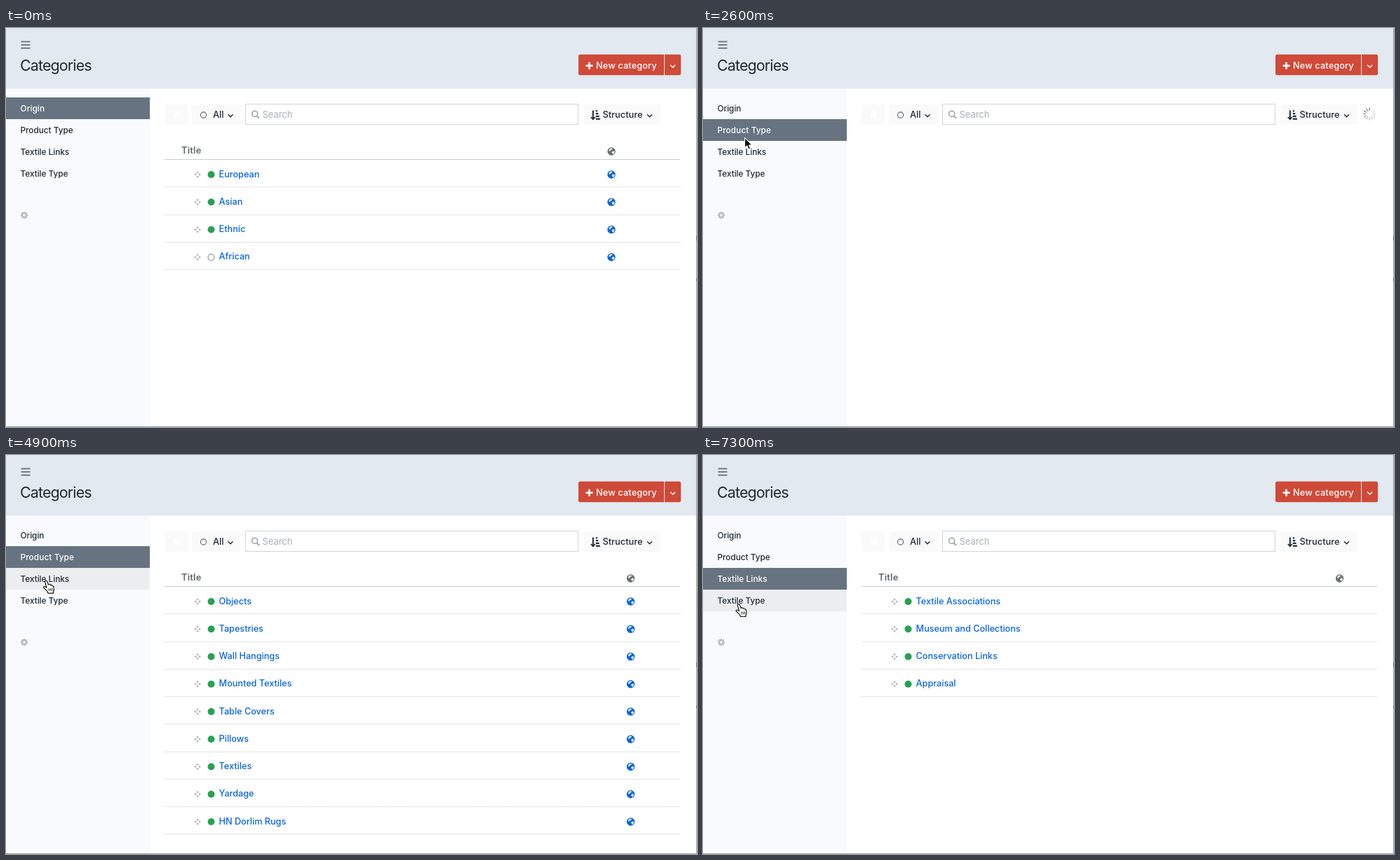
Recreate the animation shown at these times as an HTML page with a canvas. Size 985 by 569 pixels, loop 8 s.

```html
<!DOCTYPE html>
<html lang="en">
<head>
<meta charset="utf-8">
<title>Categories</title>
<style>
html, body { margin: 0; width: 100%; height: 100%; overflow: hidden; background: #fff; }
canvas { display: block; }
</style>
</head>
<body>
<canvas id="stage" width="985" height="569"></canvas>
<script>
const ctx = document.getElementById('stage').getContext('2d');
const LOOP = 8000, STEP = 100, TAU = Math.PI * 2;
const MENU_TOP = 99, MENU_PITCH = 31.1, ROW_PITCH = 39.25;
const BLUE = '#0a65db', INK = '#1f2933';

const menu = ['Origin', 'Product Type', 'Textile Links', 'Textile Type'];
const lists = [
  { globeX: 863, rows: ['European', 'Asian', 'Ethnic', 'African'], disabled: 'African', globes: true },
  { globeX: 890.5, globes: true, rows: ['Objects', 'Tapestries', 'Wall Hangings', 'Mounted Textiles',
    'Table Covers', 'Pillows', 'Textiles', 'Yardage', 'HN Dorlim Rugs'] },
  { globeX: 907.5, rows: ['Textile Associations', 'Museum and Collections', 'Conservation Links', 'Appraisal'] }
];

// Each click selects a menu item; readyAt is when its list appears.
const clicks = [{ at: 2500, readyAt: 2900, item: 1 }, { at: 5400, readyAt: 5900, item: 2 }];

const pointerPath = [
  [1100, 92, 252], [1200, 84, 216], [1300, 75, 181], [1400, 67.4, 152.6], [1600, 59, 147],
  [2000, 59, 147], [2400, 60.3, 146], [2500, 60.3, 147], [2800, 58.2, 176], [2900, 57.8, 177.4],
  [3900, 57.8, 177.4], [4600, 57.4, 179.4], [5400, 57.4, 179.4], [5700, 51.8, 211],
  [5800, 51.4, 212], [7000, 51.4, 212], [7300, 51, 212.8]
];

function pointerAt(t) {
  if (t < pointerPath[0][0]) return null;
  const next = pointerPath.findIndex(p => p[0] > t);
  if (next < 0) {
    const [, x, y] = pointerPath[pointerPath.length - 1];
    return { x, y };
  }
  const [t0, x0, y0] = pointerPath[next - 1], [t1, x1, y1] = pointerPath[next];
  const k = (t - t0) / (t1 - t0);
  return { x: x0 + (x1 - x0) * k, y: y0 + (y1 - y0) * k };
}

function hoveredItem(t) {
  const p = pointerAt(t);
  return p ? Math.floor((p.y + 1 - MENU_TOP) / MENU_PITCH) : -1;
}

function rect(x, y, w, h, color) {
  ctx.fillStyle = color;
  ctx.fillRect(x, y, w, h);
}

function roundBox(x, y, w, h, radii, color) {
  ctx.fillStyle = color;
  ctx.beginPath();
  ctx.roundRect(x, y, w, h, radii);
  ctx.fill();
}

function text(str, x, y, color, size = 12.8, weight = 500, spacing = 0) {
  ctx.font = `${weight} ${size}px Inter, sans-serif`;
  ctx.letterSpacing = spacing + 'px';
  ctx.fillStyle = color;
  ctx.fillText(str, x, y);
}

function disc(x, y, r, color) {
  ctx.fillStyle = color;
  ctx.beginPath();
  ctx.arc(x, y, r, 0, TAU);
  ctx.fill();
}

function ring(x, y, r, color, width = 1.1) {
  ctx.strokeStyle = color;
  ctx.lineWidth = width;
  ctx.beginPath();
  ctx.arc(x, y, r, 0, TAU);
  ctx.stroke();
}

function line(color, width, ...points) {
  ctx.strokeStyle = color;
  ctx.lineWidth = width;
  ctx.beginPath();
  points.forEach(([x, y]) => ctx.lineTo(x, y));
  ctx.stroke();
}

function chevron(x, y, color) {
  line(color, 1.4, [x - 3.5, y - 1.8], [x, y + 1.7], [x + 3.5, y - 1.8]);
}

function shape(x, y, path, fill, stroke, width) {
  const p = new Path2D(path);
  ctx.save();
  ctx.translate(x, y);
  ctx.lineJoin = 'round';
  if (fill) {
    ctx.fillStyle = fill;
    ctx.fill(p);
  }
  if (stroke) {
    ctx.strokeStyle = stroke;
    ctx.lineWidth = width;
    ctx.stroke(p);
  }
  ctx.restore();
}

function globe(x, y, color) {
  disc(x, y, 5.7, color);
  shape(x, y, 'M-.8-4.4L1.6-4L.6-2.6L-.8-2.2L-1.6-.8L-3-.2L-3.6-1.8L-2.4-3.4Z' +
    'M1 .4L2.6-.6L4.6.2L3.8 2.8L2 4.2L1.6 2.4L.4 1.6Z', '#fff');
}

function moveHandle(x, y) {
  const d = (dx, dy) => `M${dx} ${dy - 1.8}l1.8 1.8l-1.8 1.8l-1.8-1.8z`;
  shape(x, y, d(0, -3) + d(3, 0) + d(0, 3) + d(-3, 0), '#b3b7bb');
}

function gear(x, y) {
  for (let i = 0; i < 8; i++) {
    const a = i * TAU / 8, c = Math.cos(a), s = Math.sin(a);
    line('#b9bdc2', 2, [x + c * 3, y + s * 3], [x + c * 5.2, y + s * 5.2]);
  }
  ring(x, y, 2.9, '#b9bdc2', 2.3);
}

function spinner(t) {
  const head = Math.round((t - 5800) / 83.3) + 11;
  for (let i = 0; i < 12; i++) {
    const age = ((head - i) % 12 + 12) % 12;
    const a = i * TAU / 12, c = Math.cos(a), s = Math.sin(a);
    line(`rgba(70,75,80,${0.85 - age * 0.068})`, 1.1,
      [950 + c * 4.7, 122.5 + s * 4.7], [950 + c * 9, 122.5 + s * 9]);
  }
}

function drawHeader() {
  rect(0, 0, 985, 86.5, '#e2e9f0');
  for (let i = 0; i < 3; i++) rect(21.5, 18.6 + i * 4.6, 13, 1.8, '#66717b');
  text('Categories', 20, 61, INK, 21.4, 400, -0.83);
  const red = '#cf4a38';
  roundBox(816, 37.7, 122, 29.6, [2.5, 0, 0, 2.5], red);
  roundBox(939, 37.7, 23, 29.6, [0, 2.5, 2.5, 0], red);
  rect(826.5, 52.5, 10, 2.6, '#fff');
  rect(830.2, 48.8, 2.6, 10, '#fff');
  text('New category', 841, 57.6, '#fff', 12.7, 500, 0.15);
  chevron(950.5, 54.5, '#fff');
}

function drawSidebar(t, selected) {
  rect(0, 86.5, 205, 482, '#f8fafe');
  const hover = hoveredItem(t), trail = hoveredItem(t - STEP);
  menu.forEach((label, i) => {
    const y = Math.round(MENU_TOP + i * MENU_PITCH), active = i === selected;
    if (active) rect(0, y, 205, 31, '#677381');
    else if (i === hover) rect(0, y, 204.5, 31, '#ecedf1');
    else if (i === trail && t < 2000) rect(0, y, 204.5, 31, '#f1f2f5');
    text(label, 20.5, y + 20.4, active ? '#fff' : INK, 11.75, 500, active ? 0.12 : 0);
  });
  gear(26, 267);
}

function drawToolbar() {
  const soft = '#fafafb';
  roundBox(226, 109, 33, 29, 2.5, soft);
  disc(243, 123.5, 5, '#fff');
  roundBox(265, 109, 70, 29, 2.5, soft);
  ring(281.5, 124, 4.1, '#5b646c');
  text('All', 295, 128.2, INK);
  chevron(320, 125, INK);
  ctx.strokeStyle = '#d0d4d9';
  ctx.lineWidth = 1;
  ctx.strokeRect(341.5, 108.5, 474, 29);
  ring(354.6, 122.4, 4, '#a3a8ad', 1.7);
  line('#a3a8ad', 2.1, [357.6, 125.4], [361, 128.8]);
  text('Search', 365.5, 128.2, '#a9aeb4', 12.9, 400);
  roundBox(823, 109, 110, 29, 2.5, soft);
  line(INK, 2, [836.8, 117.5], [836.8, 130]);
  line(INK, 1.8, [833.8, 127], [836.8, 130.2], [839.8, 127]);
  for (let i = 0; i < 4; i++) rect(840.8, 117.2 + i * 3.8, 2.2 + i * 1.3, 2.2, INK);
  text('Structure', 850.5, 128.2, INK);
  chevron(917.5, 125, INK);
}

function drawList(list) {
  text('Title', 250, 179, '#5f656b', 12.8, 600, 0.25);
  globe(list.globeX, 176, '#6b6f73');
  rect(226, 187, 735, 1, '#c9cdd1');
  list.rows.forEach((label, i) => {
    const y = 209 + i * ROW_PITCH;
    moveHandle(273, y);
    if (label === list.disabled) ring(292.5, y + 0.2, 4.5, '#7d858c');
    else disc(292.5, y, 5, '#27a153');
    text(label, 303.6, y + 3.7, BLUE, 12.65);
    if (list.globes) globe(list.globeX, y, BLUE);
    ctx.setLineDash([1, 1]);
    const lineY = Math.floor(y + 17.9) + 0.5;
    line('#c6cace', 1, [226, lineY], [961, lineY]);
    ctx.setLineDash([]);
  });
}

function drawPointer(t) {
  const p = pointerAt(t);
  if (!p) return;
  const pressed = clicks.some(c => t >= c.at - 200 && t < c.at + 200);
  const overMenu = p.y < MENU_TOP + menu.length * MENU_PITCH;
  if (pressed || !overMenu) {
    shape(p.x, p.y, 'M0 0V14.2L3.2 11.2L5.5 16.4L8 15.3L5.8 10.3H10.2Z', '#000', '#fff', 1.1);
    return;
  }
  shape(p.x, p.y, 'M-1.8 1.6Q-2.2 0-.6-.2Q.8-.4 1.4 1L3 5.6Q3.6 4.5 5 5Q6 5.4 6.2 6.4' +
    'Q7 5.6 8 6.2Q8.8 6.6 9 7.4Q10 7.2 10.4 8.4L11 12Q11 14 10 15.5V17.7H2.5' +
    'Q2 15.5.5 14L-3.6 10Q-4.4 8.6-3 8.2Q-1.6 8 .6 9.8Z', '#fff', '#111', 1.2);
  shape(p.x, p.y, 'M3.6 10.8L4.2 14.5M5.9 10.6L6.4 14.5M8.1 10.4L8.5 14.3', null, '#111', 0.9);
}

function drawWindowEdge() {
  rect(983, 0, 1, 569, 'rgba(120,125,130,.12)');
  rect(984, 0, 1, 569, '#a3a6a9');
  rect(0, 568, 985, 1, '#a3a6a9');
  rect(984, 296, 1, 7, '#6f7275');
  rect(984, 357, 1, 4, '#6f7275');
}

function draw(now) {
  const t = Math.floor(now % LOOP / STEP) * STEP;
  const click = clicks.filter(c => t >= c.at).pop();
  const selected = click ? click.item : 0;
  rect(0, 0, 985, 569, '#fff');
  drawHeader();
  drawSidebar(t, selected);
  drawToolbar();
  if (click && t < click.readyAt) spinner(t);
  else drawList(lists[selected]);
  drawWindowEdge();
  drawPointer(t);
}

let start;
function tick(now) {
  start ??= now;
  draw(now - start);
  requestAnimationFrame(tick);
}
draw(0);
requestAnimationFrame(tick);
</script>
</body>
</html>
```
